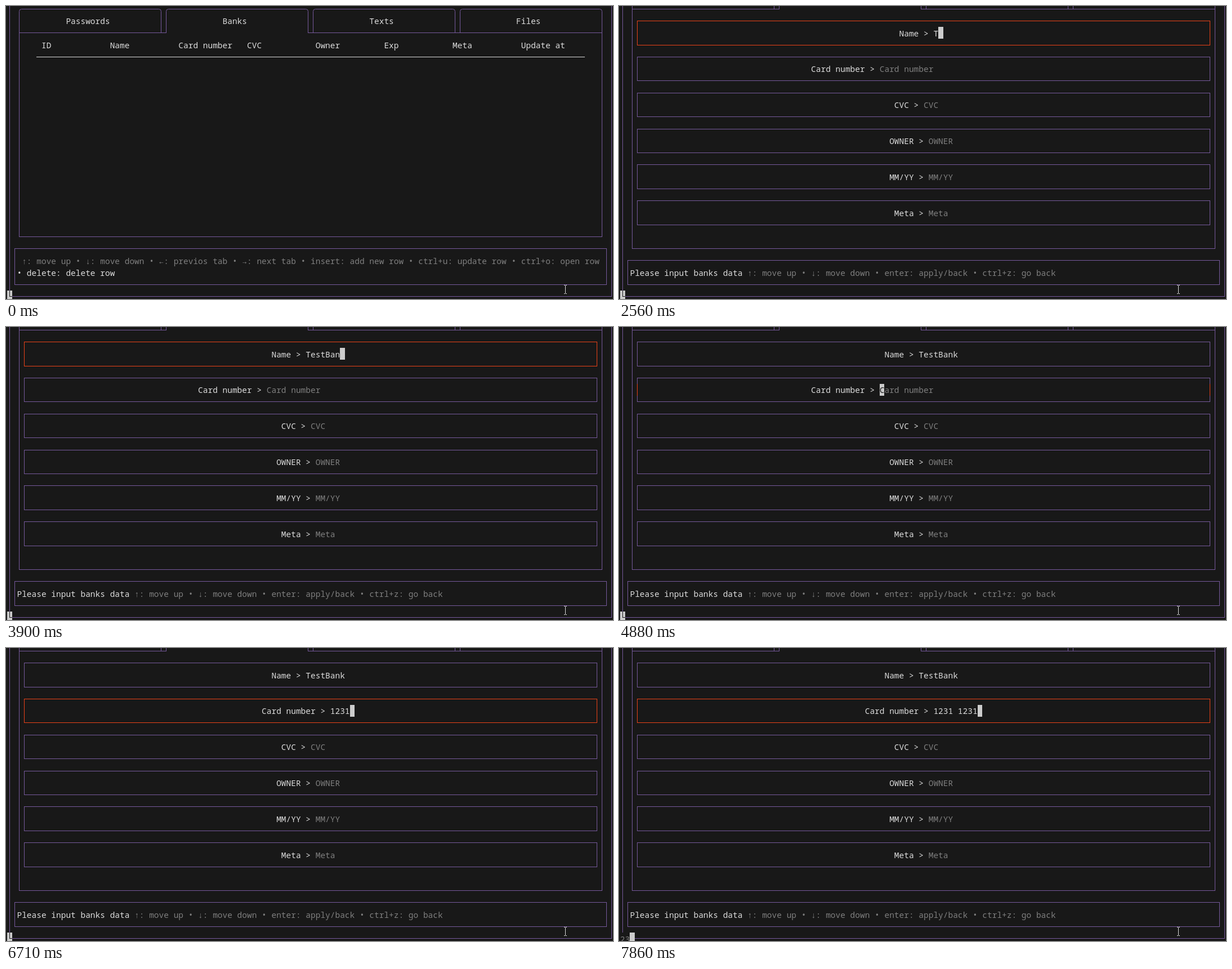
Animation, 1078 px wide and 520 px high, one loop 8000 ms. Source, as an HTML page with a canvas:

```html
<!DOCTYPE html>
<html lang="en">
<head>
<meta charset="utf-8">
<title>Terminal form</title>
<style>
html, body { margin: 0; width: 100%; height: 100%; overflow: hidden; background: #181818; }
canvas { display: block; }
</style>
</head>
<body>
<canvas id="term" width="1078" height="520"></canvas>
<script>
const ctx = document.getElementById('term').getContext('2d');
const LOOP = 8000, CW = 8.692, RH = 21.27, LEFT = 2.1, MID = 5.3;
const BG = '#181818', FG = '#dcdcdc', DIM = '#7f7f7f', BLOCK = '#cccccc';
const PURPLE = '#76599c', RED = '#ea4218';

const NAV = '↑: move up • ↓: move down • ←: previos tab • →: next tab • insert: add new row • ctrl+u: update row • ctrl+o: open row';
const FORM_HELP = '↑: move up • ↓: move down • enter: apply/back • ctrl+z: go back';
const TABS = [['Passwords', 12], ['Banks', 44], ['Texts', 74], ['Files', 104]];
const HEADERS = ['ID', 'Name', 'Card number', 'CVC', 'Owner', 'Exp', 'Meta', 'Update at'];
const EMPTY_FIELDS = [['CVC', 56], ['OWNER', 55], ['MM/YY', 55], ['Meta', 56]];

// Each step changes some of the screen state at the given time.
const STEPS = [
  [0, { view: 'table', focus: 'name', name: '', card: '', echo: '', caret: true }],
  [1190, { view: 'form' }],
  [2560, { name: 'T' }],
  [2680, { name: 'Te' }],
  [2830, { name: 'Tes' }],
  [2950, { name: 'Test' }],
  [3510, { name: 'TestB' }],
  [3660, { name: 'TestBa' }],
  [3780, { echo: 'n' }],
  [3900, { name: 'TestBan', echo: '' }],
  [4050, { echo: 'k' }],
  [4200, { name: 'TestBank', echo: '' }],
  [4730, { caret: false }],
  [4880, { focus: 'card', caret: true }],
  [6030, { card: '1', echo: '23' }],
  [6180, { card: '123', echo: '' }],
  [6710, { card: '1231' }],
  [6860, { echo: '12' }],
  [7170, { echo: '123' }],
  [7320, { card: '1231 1', echo: '23' }],
  [7470, { card: '1231 12', echo: '3' }],
  [7590, { card: '1231 123', echo: '' }],
  [7740, { echo: '12' }],
  [7860, { card: '1231 1231', echo: '23' }]
];

const cellX = c => LEFT + c * CW;
const midX = c => Math.floor(cellX(c + 0.5));
const midY = r => Math.floor(MID + r * RH);
const topY = r => Math.round(MID + (r - 0.5) * RH);

function rect(x1, y1, x2, y2, color) {
  ctx.fillStyle = color;
  ctx.fillRect(x1, y1, x2 - x1, y2 - y1);
}

const hLine = (x1, x2, y, color = PURPLE) => rect(x1, y, x2 + 1, y + 1, color);
const vLine = (x, y1, y2, color = PURPLE) => rect(x, y1, x + 1, y2 + 1, color);

function box(c1, r1, c2, r2, color) {
  const x1 = midX(c1), x2 = midX(c2), y1 = midY(r1), y2 = midY(r2);
  hLine(x1, x2, y1, color);
  hLine(x1, x2, y2, color);
  vLine(x1, y1, y2, color);
  vLine(x2, y1, y2, color);
}

function text(str, col, row, color = FG) {
  ctx.fillStyle = color;
  const y = Math.round(MID + row * RH + 5.8);
  [...str].forEach((ch, i) => ctx.fillText(ch, cellX(col + i), y));
}

function block(col, row) {
  rect(Math.round(cellX(col)), topY(row), Math.round(cellX(col + 1)), topY(row + 1), BLOCK);
}

function tabFrame(c1, c2) {
  const x1 = midX(c1) + 0.5, x2 = midX(c2) + 0.5, y = midY(0) + 0.5, r = 4;
  ctx.strokeStyle = PURPLE;
  ctx.lineWidth = 1;
  ctx.beginPath();
  ctx.moveTo(x1, midY(2));
  ctx.arcTo(x1, y, x2, y, r);
  ctx.arcTo(x2, y, x2, midY(2), r);
  ctx.lineTo(x2, midY(2));
  ctx.stroke();
}

// The second tab is active, so the line below it stays open.
function contentFrame(top, bottom) {
  const y = midY(top), l = midX(2), r = midX(121);
  hLine(l, midX(32), y);
  hLine(midX(61), r, y);
  hLine(l, r, midY(bottom));
  vLine(l, y, midY(bottom));
  vLine(r, y, midY(bottom));
}

function drawTable() {
  TABS.forEach(([label, col], i) => {
    tabFrame(2 + i * 30, 31 + i * 30);
    text(label, col, 1);
  });
  contentFrame(2, 19);
  HEADERS.forEach((label, i) => text(label, 7 + i * 14, 3));
  hLine(Math.round(cellX(6)), Math.round(cellX(118)) - 1, midY(4), FG);
  box(1, 20, 122, 23, PURPLE);
  text(NAV, 3, 21, DIM);
  text('• delete: delete row', 2, 22);
}

function field(label, hint, value, row, hintCol, focused, caret) {
  const prompt = label + ' > ';
  const len = prompt.length + value.length + 1;
  const col = value ? 4 + Math.floor((116 - len) / 2) : hintCol;
  const start = col + prompt.length;
  text(prompt, col, row);
  text(value || hint, start, row, value ? FG : DIM);
  if (focused && caret) {
    block(start + value.length, row);
    if (!value) text(hint[0], start, row, BG);
  }
}

function drawForm(s) {
  const fresh = !s.name;
  for (let i = 0; i < 4; i++) {
    vLine(midX(2 + i * 30), 0, midY(0));
    vLine(midX(31 + i * 30), 0, midY(0));
  }
  contentFrame(0, fresh ? 19 : 20);

  const onName = s.focus === 'name';
  for (let i = 0; i < 6; i++) {
    const red = i === 0 ? onName : i === 1 && s.card;
    box(3, 1 + i * 3, 120, 3 + i * 3, red ? RED : PURPLE);
  }
  if (!onName && !s.card) {
    for (const c of [3, 120]) vLine(midX(c), topY(5), topY(6) - 1, RED);
  }
  field('Name', 'Name', s.name, 2, 56, onName, s.caret);
  field('Card number', 'Card number', s.card, 5, 39, !onName, s.caret);
  EMPTY_FIELDS.forEach(([label, col], i) => field(label, label, '', 8 + i * 3, col));

  box(1, fresh ? 20 : 21, 122, 23, PURPLE);
  if (fresh) text(NAV, 3, 21, DIM);
  text('Please input banks data', 2, 22);
  text(FORM_HELP, 26, 22, DIM);
}

function drawOuter(echo) {
  const n = echo.length, y = midY(24);
  vLine(midX(0), 0, y);
  vLine(midX(123), 0, y);
  hLine(midX(0), midX(123), y);
  if (n) rect(0, topY(24), cellX(n), 520, BG);
  text(echo, 0, 24, DIM);
  block(n, 24);
  if (!n) {
    vLine(midX(0), topY(24), y, BG);
    hLine(midX(0), Math.round(cellX(1)) - 1, y, BG);
  }
}

function drawPointer() {
  vLine(993, 496, 509, FG);
  for (const y of [495, 510]) {
    hLine(991, 992, y, FG);
    hLine(994, 995, y, FG);
  }
}

function frame(now) {
  const t = now % LOOP;
  const s = {};
  for (const [at, change] of STEPS) if (at <= t) Object.assign(s, change);
  rect(0, 0, 1078, 520, BG);
  ctx.font = '14.48px "Noto Sans Mono", "DejaVu Sans Mono", monospace';
  if (s.view === 'table') drawTable();
  else drawForm(s);
  drawOuter(s.echo);
  drawPointer();
  requestAnimationFrame(() => frame(performance.now() - begin));
}

const begin = performance.now();
frame(0);
</script>
</body>
</html>
```
